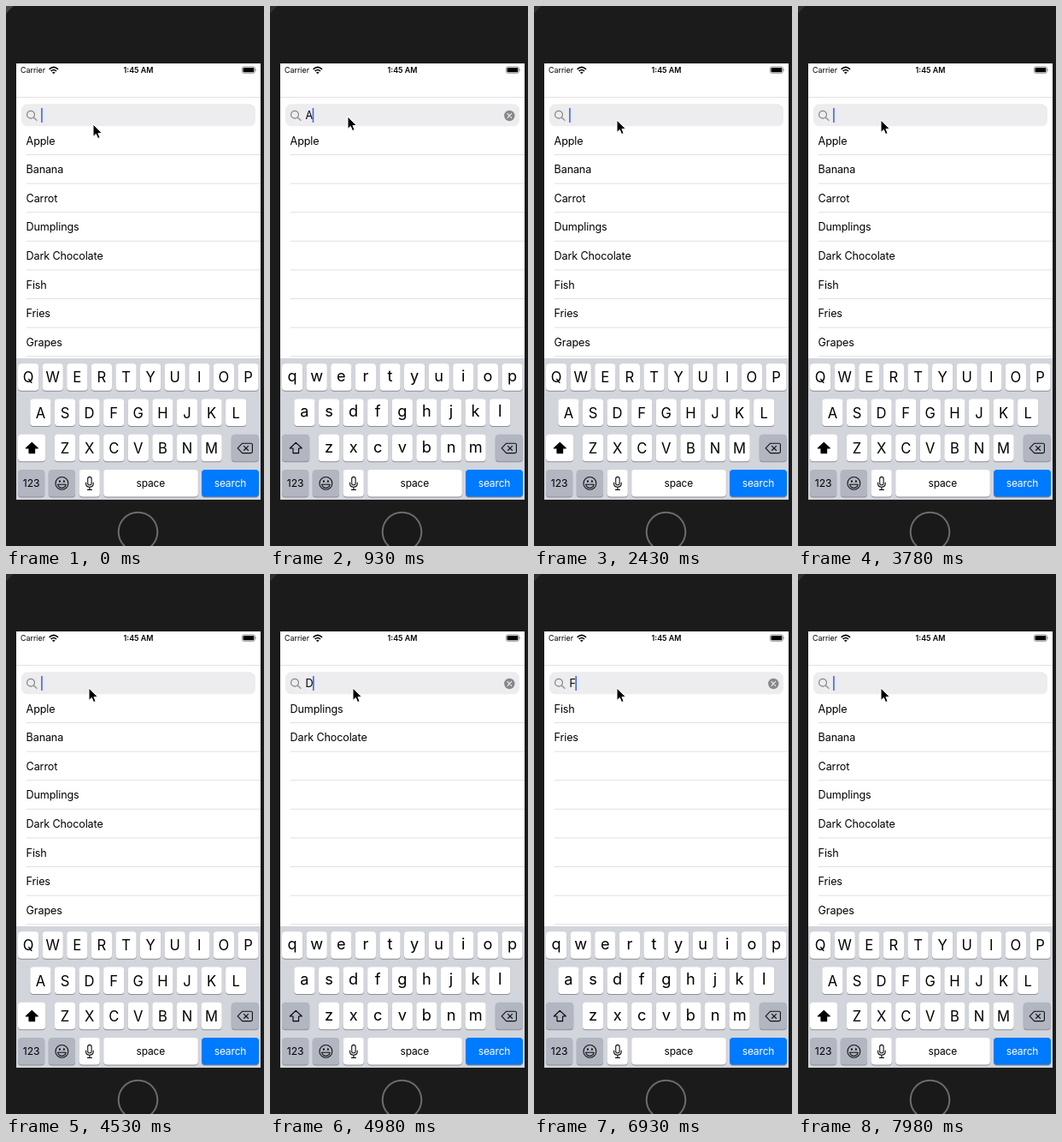
Recreate the animation shown at these times as an HTML page. Size 302 by 630 pixels, loop 8 s.

```html
<!DOCTYPE html>
<html lang="en">
<head>
<meta charset="utf-8">
<title>Food search</title>
<style>
  html, body { margin: 0; width: 100%; height: 100%; overflow: hidden; background: #1b1b1b; }
  svg { display: block; width: 100%; height: 100%; }
  text { font-family: Inter, Roboto, "Liberation Sans", sans-serif; font-size: 12.6px; letter-spacing: -.14px; }
  .mid { text-anchor: middle; }
  .status { font-size: 8.9px; letter-spacing: 0; }
  .key { fill: #fff; }
  .grey { fill: #b1b6c0; }
  .edge { fill: #898c92; }
  .letter { text-anchor: middle; letter-spacing: 0; }
  .upper .letter { font-size: 16.6px; }
  .lower .letter { font-size: 18.2px; }
  .line { fill: none; stroke: #111; stroke-width: 1.1; stroke-linecap: round; stroke-linejoin: round; }
</style>
</head>
<body>
<svg viewBox="0 0 302 630">
  <rect width="302" height="630" fill="#1b1b1b"/>
  <path id="corner" d="M0 0H9Q4 4 0 9Z" fill="#484848"/>
  <circle cx="154.5" cy="613.5" r="22.8" fill="#191919" stroke="#6c6c6c" stroke-width="2"/>
  <rect x="12" y="67" width="286" height="509" fill="#fff"/>

  <!-- status bar -->
  <text class="status" x="17" y="78">Carrier</text>
  <g fill="none" stroke="#000" stroke-width="1.6">
    <path d="M50.6 73.8Q55.8 68.8 61 73.8"/>
    <path d="M52.6 76Q55.8 73 59 76"/>
  </g>
  <path d="M54 77.4Q55.8 75.9 57.6 77.4L55.8 79.2Z"/>
  <text class="status mid" x="155" y="78" font-weight="600">1:45 AM</text>
  <rect x="276.4" y="70.9" width="15" height="7.4" rx="2" fill="none" stroke="#777" stroke-width=".8"/>
  <rect x="277.5" y="72" width="12.8" height="5.2" rx="1"/>
  <path d="M292.4 73.2Q294 74.6 292.4 76Z" fill="#777"/>
  <rect x="12" y="106" width="286" height="1" fill="#e2e2e4"/>

  <!-- search field -->
  <rect x="18" y="114.3" width="274" height="25.9" rx="7" fill="#ededf0"/>
  <g fill="none" stroke="#828287" stroke-width="1.2" stroke-linecap="round">
    <circle cx="29" cy="126.7" r="4.4"/>
    <path d="M32.3 130L36 133.4"/>
  </g>
  <g id="clear">
    <circle cx="280.3" cy="128" r="6.2" fill="#87878c"/>
    <path d="M278 125.7l4.6 4.6m0-4.6l-4.6 4.6" stroke="#f2f2f4" stroke-width="1.2" stroke-linecap="round"/>
  </g>
  <text id="query" x="41.5" y="132"></text>
  <rect id="caret" y="119" width="1.6" height="17" fill="#4169e1"/>

  <g id="lines" fill="#e0e0e2"></g>
  <path id="bubble" fill="#f2f2f2" stroke="#e6e6e6" stroke-width=".6"
    d="M26 147.3H36L42 141.5L48 147.3H67Q73 147.3 73 153V167.5Q73 173.3 67 173.3H26Q20.4 173.3 20.4 167.5V153Q20.4 147.3 26 147.3Z"/>
  <g id="rows"></g>

  <!-- keyboard -->
  <rect x="12" y="411" width="286" height="165" fill="#d2d5db"/>
  <g id="keys"></g>
  <path id="shift" stroke="#000" stroke-width="1.1" stroke-linejoin="round"
    d="M30.3 509.3L37.3 516H33.6V521.6H27V516H23.3Z"/>
  <g class="line">
    <path d="M276.6 510.2H286.8Q288.4 510.2 288.4 511.8V520Q288.4 521.6 286.8 521.6H276.6L271.2 515.9Z"/>
    <path d="M278.4 513.3l5.2 5.2m0-5.2l-5.2 5.2"/>
    <circle cx="65.4" cy="556.9" r="7.4"/>
    <path d="M60.6 558.2H70.2Q69.4 562.2 65.4 562.2T60.6 558.2Z"/>
    <rect x="95.7" y="549.4" width="4.4" height="9.6" rx="2.2"/>
    <path d="M93.6 556V557.4Q93.8 561.2 97.9 561.2T102.2 557.4V556M97.9 561.2V564.4M95.4 564.4H100.4"/>
  </g>
  <ellipse cx="62.9" cy="554.6" rx=".9" ry="1.4"/>
  <ellipse cx="67.9" cy="554.6" rx=".9" ry="1.4"/>
  <text class="mid" x="29.6" y="561.4" style="font-size:12.2px">123</text>
  <text class="mid" x="169.3" y="560.6" style="font-size:12px">space</text>
  <text class="mid" x="262.5" y="560.6" style="font-size:12px" fill="#fff">search</text>

  <path id="mouse" stroke="#fff" stroke-width="1" stroke-linejoin="round"
    d="M0 0V14.4L3.3 11.4L5.6 16.6L8.1 15.5L5.9 10.5H10.4Z"/>
</svg>
<script>
const LOOP = 8000, TICK = 150, OFFSET = 30, ROW = 33.6;
const foods = ['Apple', 'Banana', 'Carrot', 'Dumplings', 'Dark Chocolate', 'Fish', 'Fries', 'Grapes'];
const typed = [[0, ''], [930, 'A'], [2430, ''], [2730, 'B'], [3780, ''], [4230, 'C'],
  [4530, ''], [4980, 'D'], [6180, ''], [6930, 'F'], [7980, '']];
// moments at which the caret starts a fresh blink
const wakes = [-420, 1530, ...typed.slice(1).map(e => e[0])].sort((a, b) => a - b);
const mouseX = [[30, 102], [630, 91], [1230, 91], [1830, 97]];
const mouseY = [[30, 138], [630, 129], [1230, 129], [1830, 133]];
const bubbleFade = [[930, 0], [1230, 1], [1530, 1], [1830, 0]];

const $ = id => document.getElementById(id);
function add(parent, tag, attrs, label = '') {
  const el = document.createElementNS('http://www.w3.org/2000/svg', tag);
  for (const name in attrs) el.setAttribute(name, attrs[name]);
  el.textContent = label;
  return parent.appendChild(el);
}

function key(x, y, width, kind = 'key') {
  const box = { x, width, height: 31.6, rx: 4 };
  add($('keys'), 'rect', { ...box, y: y + 1, class: 'edge' });
  return add($('keys'), 'rect', { ...box, y, class: kind });
}

const letters = [];
[['QWERTYUIOP', 14, 417.2], ['ASDFGHJKL', 28.3, 458.4], ['ZXCVBNM', 56.9, 499.7]].forEach(([word, left, y]) => {
  [...word].forEach((char, i) => {
    const x = left + i * 28.6;
    key(x, y, 24.2);
    letters.push({ char, y, el: add($('keys'), 'text', { x: x + 12.1, class: 'letter' }) });
  });
});
const shiftKey = key(14, 499.7, 32.2);
key(263.8, 499.7, 32, 'grey');
key(14, 541, 31.2, 'grey');
key(49.8, 541, 31.2, 'grey');
key(85.6, 541, 24.2);
key(114.2, 541, 110.6);
key(229, 541, 67).style.fill = '#007aff';

const rows = foods.map((food, i) => {
  add($('lines'), 'rect', { x: 24, y: 173 + i * ROW, width: 274, height: 1 });
  return add($('rows'), 'text', { x: 23.6, y: 161.6 + i * ROW });
});

function lerp(points, t) {
  if (t <= points[0][0]) return points[0][1];
  for (let i = 1; i < points.length; i++) {
    const [t0, a] = points[i - 1], [t1, b] = points[i];
    if (t <= t1) return a + (b - a) * (t - t0) / (t1 - t0);
  }
  return points[points.length - 1][1];
}

let shown = null, caretX = 0;
function showQuery(query) {
  shown = query;
  $('query').textContent = query;
  caretX = 41.1 + (query ? $('query').getComputedTextLength() : 0);
  $('clear').style.opacity = query ? 1 : 0;
  const hits = foods.filter(food => food.startsWith(query));
  rows.forEach((row, i) => { row.textContent = hits[i] || ''; });

  const upper = !query;
  $('keys').setAttribute('class', upper ? 'upper' : 'lower');
  letters.forEach(({ char, y, el }) => {
    el.textContent = upper ? char : char.toLowerCase();
    el.setAttribute('y', y + (upper ? 22.2 : 20.9));
  });
  shiftKey.setAttribute('class', upper ? 'key' : 'grey');
  $('shift').setAttribute('fill', upper ? '#000' : 'none');
}

function render(time) {
  const t = Math.max(0, Math.floor((time - OFFSET) / TICK) * TICK + OFFSET);
  const query = typed.filter(e => e[0] <= t).pop()[1];
  if (query !== shown) showQuery(query);

  const phase = (t - wakes.filter(w => w <= t).pop()) % 1050;
  $('caret').setAttribute('x', caretX);
  $('caret').style.opacity = phase < 600 ? 1 : phase < 750 ? .5 : 0;
  $('bubble').style.opacity = lerp(bubbleFade, t);
  $('corner').style.opacity = lerp([[30, 1], [630, .45]], t);
  $('mouse').setAttribute('transform', `translate(${lerp(mouseX, t)} ${lerp(mouseY, t)})`);
}

const start = performance.now();
function loop(now) {
  render(Math.max(0, now - start) % LOOP);
  requestAnimationFrame(loop);
}
render(0);
requestAnimationFrame(loop);
</script>
</body>
</html>
```
